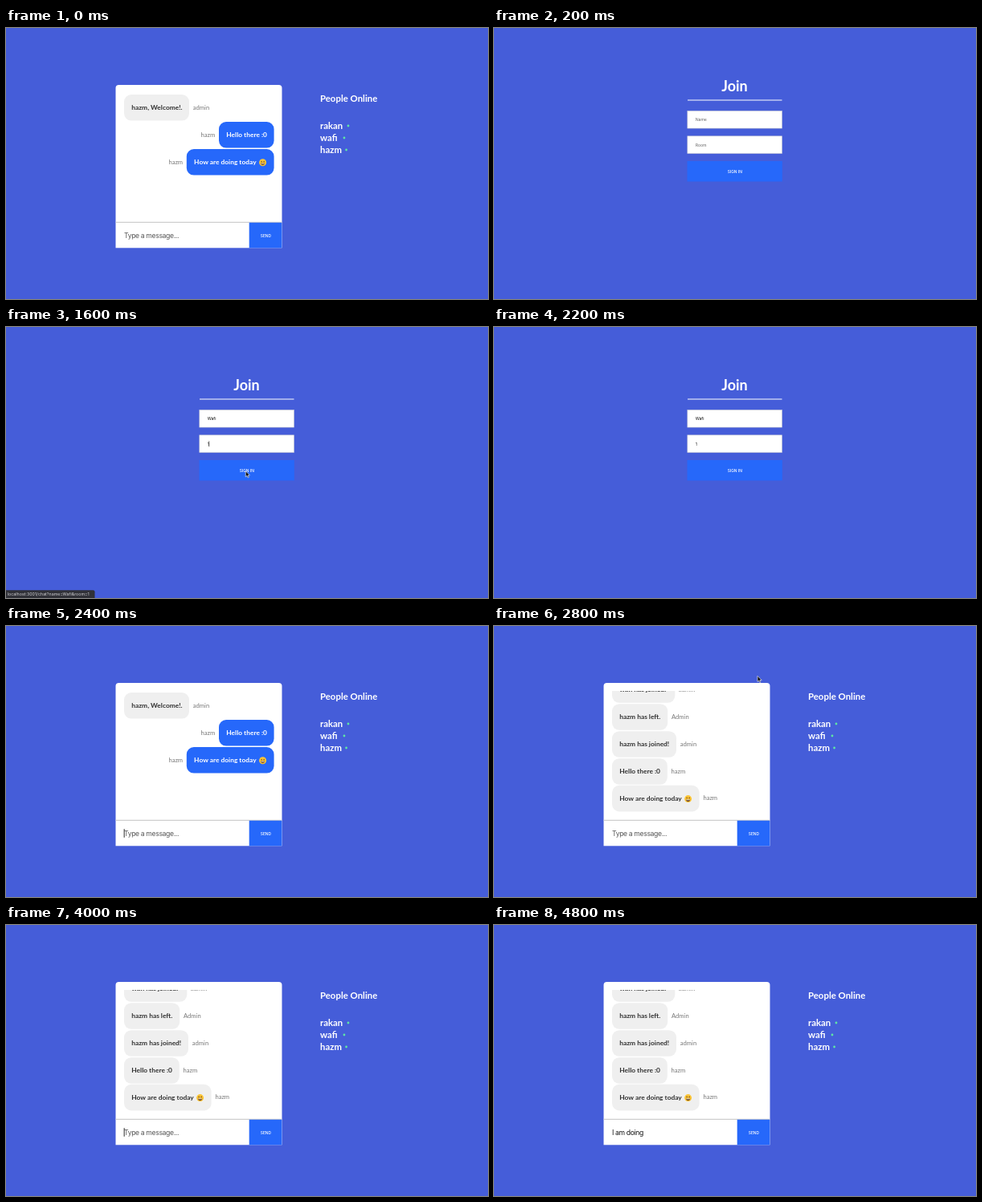
These frames come from a looping animation (600 by 338 pixels, 5000 ms). An HTML page:

```html
<!DOCTYPE html>
<html lang="en">
<head>
<meta charset="utf-8">
<title>Chat demo</title>
<style>
  html, body { margin: 0; width: 100%; height: 100%; overflow: hidden; background: #455dd9; }
  svg { display: block; width: 100vw; height: 100vh; }
  text { white-space: pre; font-family: Lato, "Open Sans", sans-serif; }
  .title { font-weight: 700; fill: #fff; }
  .msg { font-weight: 700; font-size: 8.4px; }
  .who { font-size: 7.6px; fill: #777; }
  .ui { font-family: Inter, "Liberation Sans", sans-serif; }
  .field { font-size: 5.2px; letter-spacing: -.02em; }
  .compose { font-size: 8.6px; letter-spacing: -.04em; }
  .button { font-size: 4.9px; font-weight: 500; fill: #fff; text-anchor: middle; }
</style>
</head>
<body>
<svg viewBox="0 0 600 338" preserveAspectRatio="none">
  <defs>
    <clipPath id="panelClip"><path d="M136.5 275V75q0-4 4-4h199q4 0 4 4v200z"/></clipPath>
    <clipPath id="listClip"><rect x="137" y="81" width="206" height="160"/></clipPath>
    <g id="smile">
      <circle r="4.5" fill="#fcc636"/>
      <ellipse cx="-1.5" cy="-1.2" rx=".6" ry=".9" fill="#663b16"/>
      <ellipse cx="1.5" cy="-1.2" rx=".6" ry=".9" fill="#663b16"/>
      <path d="M-2.8.8H2.8Q2.2 3.3 0 3.3T-2.8.8z" fill="#663b16"/>
      <path d="M-2.3 1H2.3L2 1.7H-2z" fill="#fff"/>
    </g>
  </defs>

  <rect id="gap" width="50" height="338" fill="#000"/>

  <g id="join">
    <text class="title" x="299.5" y="78.5" font-size="18" text-anchor="middle">Join</text>
    <path d="M241 90H358.5" stroke="#fff"/>
    <g fill="#fff" stroke="#b9bdd0" stroke-width=".6">
      <rect x="240.8" y="103.3" width="117.8" height="21.8"/>
      <rect x="240.8" y="134.8" width="117.8" height="21.8"/>
    </g>
    <text id="name" class="ui field" x="250.8" y="116.3"></text>
    <text id="room" class="ui field" x="250.8" y="147.8"></text>
    <rect x="240.5" y="166" width="118.3" height="25.5" fill="#2668fa"/>
    <text class="ui button" x="299.8" y="180.6">SIGN IN</text>
  </g>

  <g id="chat">
    <g clip-path="url(#panelClip)">
      <rect x="136" y="71" width="208" height="203.3" fill="#fff"/>
      <rect x="136" y="241.8" width="208" height="1" fill="#c3c3c3"/>
      <rect x="302.7" y="242.7" width="41" height="31.6" fill="#2668fa"/>
    </g>
    <text class="ui button" x="323.4" y="260.7">SEND</text>
    <g id="sent" clip-path="url(#listClip)"></g>
    <g id="received" clip-path="url(#listClip)"></g>
    <rect id="thumb" x="339" y="121" width="3.4" height="110" rx="1.7" fill="#bdbdbd"/>
    <text id="compose" class="ui compose" x="147" y="262"></text>
    <text class="title" x="391" y="92" font-size="11.4">People Online</text>
    <g id="people" class="title" font-size="11.4"></g>
  </g>

  <rect id="caret" fill="#111"/>

  <g id="status">
    <path d="M0 328.3H108.5q2 0 2 2V338H0z" fill="#303138"/>
    <text class="ui" x="1.8" y="335.2" font-size="5.3" fill="#d0d0d4">localhost:3001/chat?name=Wafi&amp;room=1</text>
  </g>

  <path id="arrow" d="M0 0V7.2L1.7 5.7 2.8 8.2 4 7.7 2.9 5.2H5.2z" fill="#111" stroke="#fff" stroke-width=".6"/>
  <path id="beam" d="M-1.6 0Q0 0 0 1.2Q0 0 1.6 0M0 1.2V7.8M-1.6 9Q0 9 0 7.8Q0 9 1.6 9" fill="none" stroke="#333" stroke-width=".7"/>
  <path id="hand" d="M1.6 5V.9q.8-.9 1.5 0V3.4l3 .7q.9.4.7 1.4L6.2 8.6H2.7L.3 5.6q0-1.2 1.3-.6z" fill="#fff" stroke="#111" stroke-width=".5"/>
</svg>
<script>
const $ = id => document.getElementById(id);
const BLUE = '#2668fa', GRAY = '#efefef', ROW = 34;

function bubble(list, [text, who, left, right, top, mine, emoji]) {
  const label = mine
    ? `x="${left - 4.7}" text-anchor="end"`
    : `x="${right + 4.8}"`;
  list.innerHTML += `
    <rect x="${left}" y="${top}" width="${right - left}" height="32.6" rx="9" fill="${mine ? BLUE : GRAY}"/>
    <text class="msg" x="${left + 9.3}" y="${top + 19}" fill="${mine ? '#fff' : '#303030'}">${text}</text>
    <text class="who" x="0" y="${top + 18.5}" ${label}>${who}</text>`.replace('x="0" ', '');
  if (emoji) list.innerHTML += `<use href="#smile" x="${right - 14}" y="${top + 16.8}"/>`;
}

[
  ['hazm, Welcome!.', 'admin', 147, 228, 83],
  ['Hello there :0', 'hazm', 265, 333.6, 117, true],
  ['How are doing today', 'hazm', 224.8, 333.6, 151, true, true]
].forEach(row => bubble($('sent'), row));

[
  ['wafi has joined!', 'admin', 225.3],
  ['hazm has left.', 'Admin', 216.2],
  ['hazm has joined!', 'admin', 227],
  ['Hello there :0', 'hazm', 215.8],
  ['How are doing today', 'hazm', 255.6, true]
].forEach(([text, who, right, emoji], i) =>
  bubble($('received'), [text, who, 147, right, 63.2 + ROW * i - (i > 3 ? .4 : 0), false, emoji]));

[['rakan', 426], ['wafi', 421], ['hazm', 423.6]].forEach(([name, dot], i) => {
  const y = 126 + 15 * i;
  $('people').innerHTML += `<text x="391" y="${y}">${name}</text>
    <circle cx="${dot}" cy="${y - 4}" r="1.4" fill="#5fe6a4"/>`;
});

// Each step lists only what differs from the step before it.
const steps = [
  [0, { page: 'chat', list: 'sent', compose: '', name: '', room: '', caret: null, pointer: null, shift: 0 }],
  [200, { page: 'join' }],
  [400, { pointer: ['beam', 311.5, 109] }],
  [600, { caret: 'name', pointer: ['beam', 311.5, 106.5] }],
  [1000, { name: 'Wa', pointer: null }],
  [1200, { name: 'Wafi' }],
  [1400, { room: '1', caret: 'room' }],
  [1600, { pointer: ['arrow', 298.3, 179.7], status: true }],
  [1800, { caret: null, pointer: ['hand', 297, 180] }],
  [2000, { pointer: null, status: false, shift: 50 }],
  [2200, { shift: 0 }],
  [2400, { page: 'chat', caret: 'compose' }],
  [2600, { list: 'received', caret: null, thumb: true }],
  [2800, { thumb: false, pointer: ['arrow', 328, 62.3] }],
  [3000, { caret: 'compose', pointer: ['beam', 229, 249.5] }],
  [3200, { caret: null }],
  [3400, { compose: 'Hi', caret: 'compose', pointer: null }],
  [3600, { compose: 'Hi s' }],
  [3800, { compose: 'Hi' }],
  [4000, { compose: '' }],
  [4200, { compose: 'I' }],
  [4400, { compose: 'I am d' }],
  [4600, { compose: 'I am doing ' }],
  [4800, { caret: null }]
];
const LOOP = 5000;
const hints = { name: 'Name', room: 'Room', compose: 'Type a message...' };
const caretBox = { name: [110.5, 7], room: [142.3, 7], compose: [253.2, 10.6] };

const show = (id, on) => $(id).style.display = on ? '' : 'none';

function placeCaret(field, value) {
  show('caret', field);
  if (!field) return;
  const [y, height] = caretBox[field];
  const input = $(field);
  const width = value ? input.getComputedTextLength() : 0;
  const attrs = { x: +input.getAttribute('x') - .3 + width, y, width: height > 9 ? .9 : .6, height };
  for (const key in attrs) $('caret').setAttribute(key, attrs[key]);
}

function draw(s) {
  for (const id of ['join', 'chat']) show(id, s.page === id);
  for (const id of ['sent', 'received']) show(id, s.list === id);
  for (const id in hints) {
    $(id).textContent = s[id] || hints[id];
    $(id).setAttribute('fill', s[id] ? '#111' : id === 'compose' ? '#555' : '#666');
  }
  show('thumb', s.thumb);
  show('status', s.status);
  show('gap', s.shift);
  $('join').setAttribute('transform', `translate(${s.shift})`);
  placeCaret(s.caret, s[s.caret]);
  for (const id of ['arrow', 'beam', 'hand']) show(id, s.pointer && s.pointer[0] === id);
  if (s.pointer) {
    const [id, x, y] = s.pointer;
    $(id).setAttribute('transform', `translate(${x} ${y})`);
  }
}

const start = performance.now();
let current = -1;
function tick() {
  const time = (performance.now() - start) % LOOP;
  const index = steps.filter(([at]) => at <= time).length - 1;
  if (index !== current) {
    current = index;
    draw(Object.assign({}, ...steps.slice(0, index + 1).map(step => step[1])));
  }
  requestAnimationFrame(tick);
}
tick();
</script>
</body>
</html>
```
